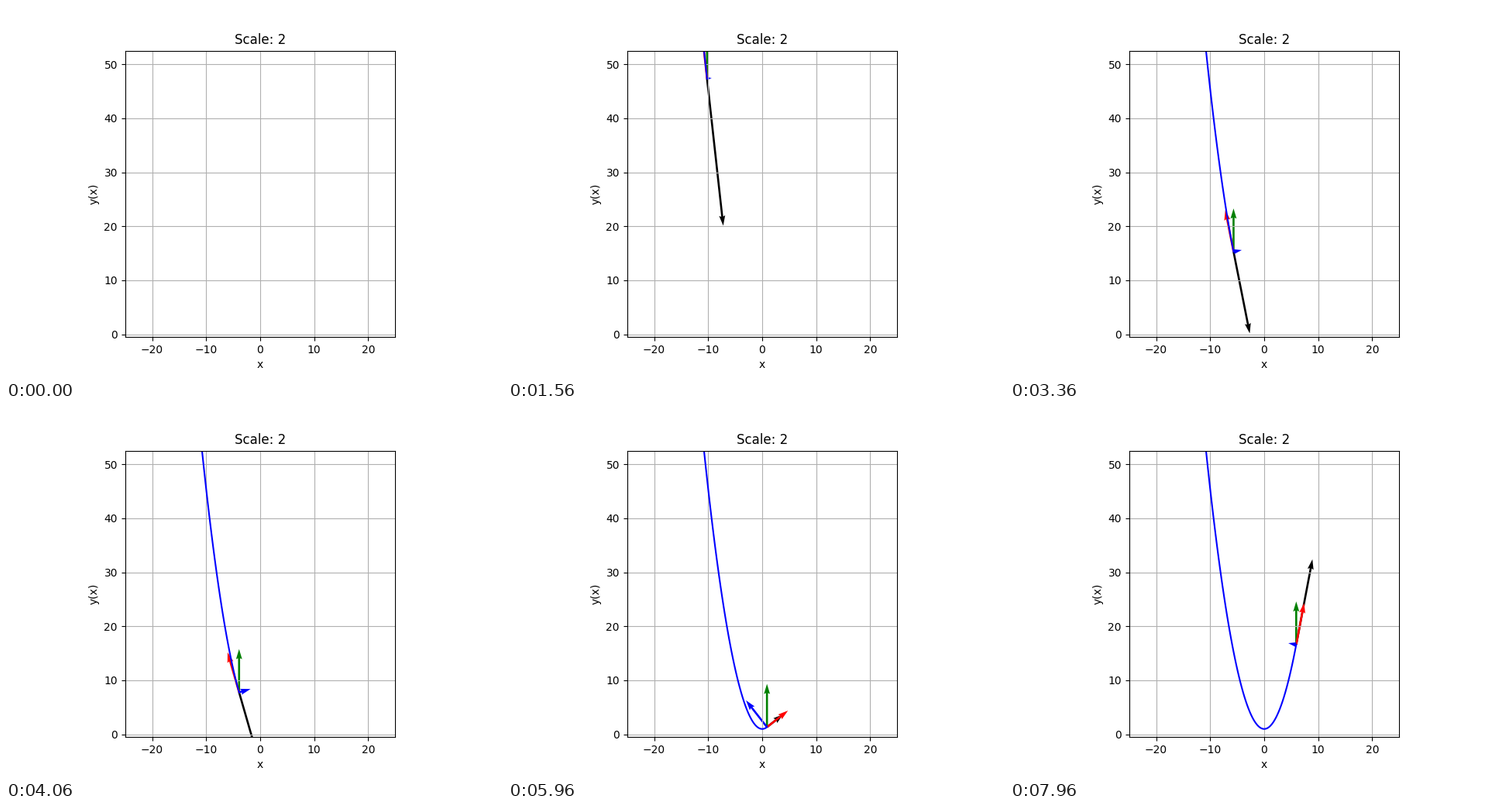
Animation of 640x480 px, one loop 8 s. Source, as a matplotlib script:

```python
import numpy as np
import matplotlib.pyplot as plt
from matplotlib.animation import FuncAnimation

LOOP_MS, INTERVAL_MS, STEP_MS = 8000, 20, 100
PHASE_MS = 40      # how far the first step has already run
FIRST_STEP = 3

times = np.linspace(-5, 5, 120)
path = np.column_stack([3 * times, 4 * times**2 + 1])
acceleration = np.array([0.0, 8.0])

fig, ax = plt.subplots(figsize=(6.4, 4.8), dpi=100)
ax.set(xlim=(-25, 25), ylim=(-0.5, 52.5), aspect="equal",
       xticks=range(-20, 21, 10), yticks=range(0, 51, 10),
       xlabel="x", ylabel="y(x)", title="Scale: 2")
ax.grid(True)

trail, = ax.plot([], [], "b")
arrows = [ax.quiver(0, 0, 1, 1, color=color, angles="xy", scale_units="xy", scale=1)
          for color in ("k", "g", "r", "b")]


def vectors(t):
    """Velocity, acceleration, and its tangential and normal parts."""
    velocity = np.array([3.0, 8 * t])
    tangent = velocity / np.hypot(*velocity)
    tangential = acceleration @ tangent * tangent
    return velocity, acceleration, tangential, acceleration - tangential


def update(frame):
    step = FIRST_STEP + (frame * INTERVAL_MS + PHASE_MS) // STEP_MS
    trail.set_data(*path[:step + 1].T)
    for arrow, vector in zip(arrows, vectors(times[step])):
        arrow.set_offsets([path[step]])
        arrow.set_UVC(*vector)
    return [trail, *arrows]


anim = FuncAnimation(fig, update, frames=LOOP_MS // INTERVAL_MS,
                     interval=INTERVAL_MS, repeat=True, repeat_delay=0)
plt.show()
```
